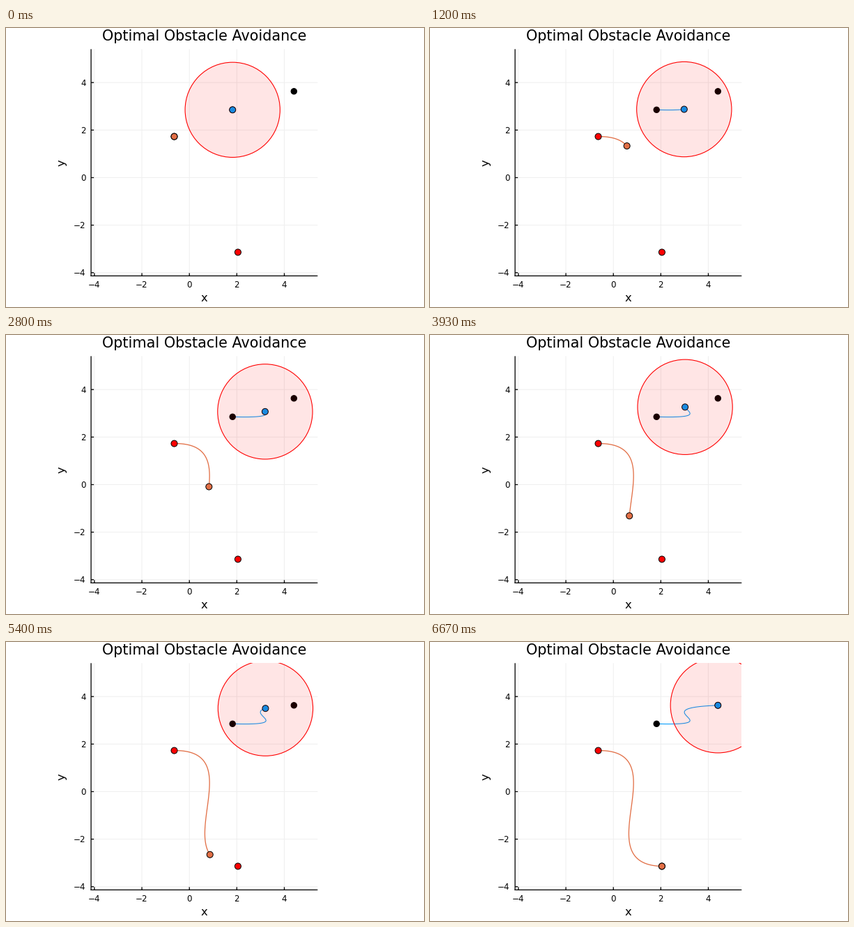
A matplotlib script that plays this animation: 600 by 400 pixels, repeating every 6740 ms.

```python
import numpy as np
import matplotlib.pyplot as plt
from matplotlib.animation import FuncAnimation
from matplotlib.patches import Circle, Rectangle

W, H, DPI = 600, 400, 100
PT = 72 / DPI                 # points per pixel
LOOP, TICK = 6740, 20         # ms
STEPS, FPS = 100, 15          # simulation steps, steps per second
UNIT = 34.07                  # pixels per data unit
X0, Y0 = 263.2, 214.5         # data origin on the stage
LEFT, TOP, RIGHT, BOTTOM = 122.1, 30.3, 447.3, 355.4

plt.rcParams["font.family"] = "DejaVu Sans"

fig = plt.figure(figsize=(W / DPI, H / DPI), dpi=DPI, facecolor="white")
ax = fig.add_axes([0, 0, 1, 1])
ax.set_xlim(0, W)
ax.set_ylim(H, 0)
ax.axis("off")


def stroke(xs, ys, color="black", width=1.3, z=1):
    line, = ax.plot(xs, ys, color=color, lw=width * PT, zorder=z,
                    solid_capstyle="butt", snap=False)
    return line


def disc(pos, radius, fill, edge, width, z):
    return ax.add_patch(Circle(pos, radius, fc=fill, ec=edge, lw=width * PT,
                               zorder=z, snap=False))


def dot(pos, color, z, radius=4.5):
    return disc(pos, radius, color, "black", 1, z)


def label(x, y, text, size, **kw):
    kw.setdefault("ha", "center")
    ax.text(x, y, text, fontsize=size * PT, va="baseline", **kw)


def cubic(start, a, b, c):
    s = np.arange(STEPS + 1) / STEPS
    return start + s * (a + s * (b + s * c))


# Minimum-effort trajectories: each coordinate is a cubic in time
robot = np.column_stack([cubic(241.5, 348.6, -757.7, 500.5),
                         cubic(155.6, -4.2, 499.1, -329.0)])
obstacle = np.column_stack([cubic(325.2, 339.6, -755.5, 504.0),
                            cubic(117.3, 9.7, -86.2, 50.0)])

# Grid, ticks and tick labels
for v in range(-4, 5, 2):
    x, y = X0 + v * UNIT, Y0 - v * UNIT
    name = str(v).replace("-", "\u2212")
    stroke([x, x], [TOP, BOTTOM], "#efefef", 1, 0)
    stroke([LEFT, RIGHT], [y, y], "#efefef", 1, 0)
    stroke([x, x], [BOTTOM, BOTTOM - 4])
    stroke([LEFT, LEFT + 4], [y, y])
    label(x, 371.8, name, 11.9)
    label(114.6, y + 4.3, name, 11.9, ha="right")

stroke([LEFT, LEFT], [TOP, BOTTOM + 0.6])
stroke([LEFT - 0.6, RIGHT], [BOTTOM, BOTTOM])

label(284.6, 18.4, "Optimal Obstacle Avoidance", 20.78)
label(284.5, 391.6, "x", 16.4)
label(85, 192.7, "y", 16.4, rotation=90, rotation_mode="anchor")

# Trails, end points and moving bodies
obstacle_trail = stroke([], [], "#009afa", 1.05, 2)
robot_trail = stroke([], [], "#e26f46", 1.3, 2)
for end in (0, -1):
    dot(robot[end], "#ff0000", 3)
    dot(obstacle[end], "black", 3, 4.2)
obstacle_dot = dot(obstacle[0], "#009afa", 4)
robot_dot = dot(robot[0], "#e26f46", 4)

# The safety zone tints whatever lies below it
zone = disc(obstacle[0], 2 * UNIT, (1, 0, 0, 0.1), "none", 0, 5)
rim = disc(obstacle[0], 2 * UNIT, "none", "#ff0000", 1.1, 5)
window = Rectangle((LEFT, TOP), RIGHT - LEFT, BOTTOM - TOP,
                   transform=ax.transData)
for patch in (zone, rim):
    patch.set_clip_path(window)


def draw(i):
    time = i * TICK + TICK / 2 + 5
    k = min(int(time * FPS / 1000), STEPS)
    for path, trail, bodies in (
            (robot, robot_trail, (robot_dot,)),
            (obstacle, obstacle_trail, (obstacle_dot, zone, rim))):
        trail.set_data(path[:k + 1, 0], path[:k + 1, 1])
        for body in bodies:
            body.center = tuple(path[k])
    return robot_trail, obstacle_trail, robot_dot, obstacle_dot, zone, rim


anim = FuncAnimation(fig, draw, frames=LOOP // TICK, interval=TICK,
                     repeat=True, repeat_delay=0, blit=False)
plt.show()
```
